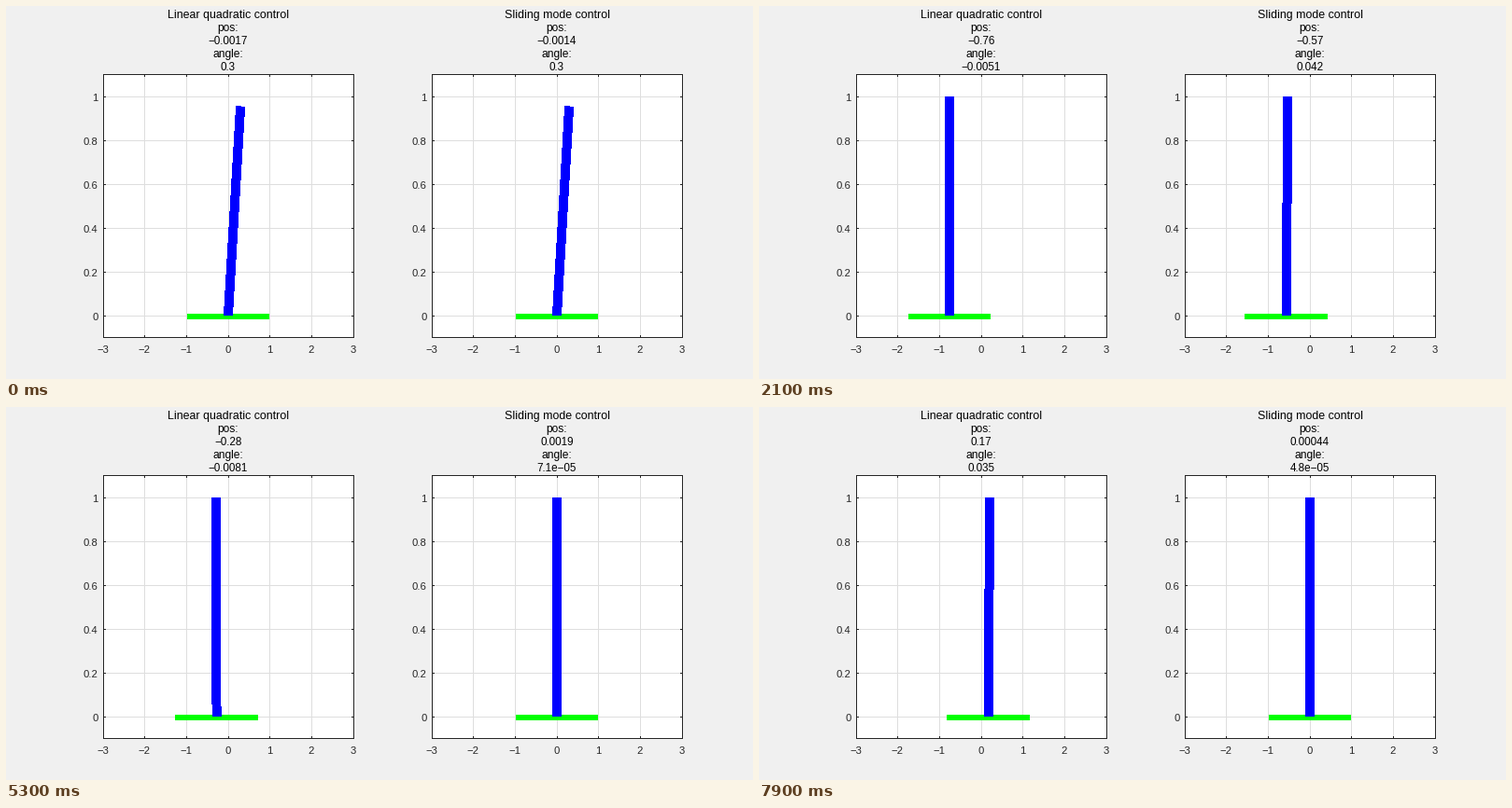
Write a matplotlib script that moves like this. It is 800 px wide and 400 px high and loops after 8 s.

```python
import numpy as np
import matplotlib.pyplot as plt
from matplotlib.animation import FuncAnimation
from matplotlib.patches import Polygon, Rectangle

W, H, DPI = 800, 400, 100
FRAMES, STEP = 80, 100
TOP, BOTTOM, BASE, SPAN = 73, 355, 332, 268
UNIT_X, UNIT_Y = SPAN / 6, 235
DARK, GRID = "#262626", "#dedede"

plt.rcParams["font.family"] = "Liberation Sans"

# Key poses: seconds, then position and angle of each cart
KEYS = np.array([
    (0, -.0017, .3, -.0014, .3),
    (.4, -.75, .02, -.65, .08),
    (.7, -1.28, -.145, -1.335, -.13),
    (1, -1.41, -.15, -1.66, -.21),
    (1.5, -1.22, -.085, -1.295, -.092),
    (2.1, -.76, -.0051, -.57, .042),
    (2.9, -.21, .055, -.052, .057),
    (3.6, -.12, .022, .022, .019),
    (4.4, -.19, .0042, .01, .0035),
    (5.4, -.283, -.01, .0016, -6e-5),
    (6.2, -.22, -.019, .00058, -9.2e-5),
    (7.9, .17, .035, .00044, 4.8e-5)])


def spline(t, knots, values):
    """Cubic spline through the knots, at rest at both ends."""
    h = np.diff(knots)[:, None]
    rise = np.diff(values, axis=0) / h ** 2
    system = np.eye(len(knots))
    target = np.zeros_like(values)
    for i in range(1, len(knots) - 1):
        a, b = 1 / h[i - 1, 0], 1 / h[i, 0]
        system[i, i - 1:i + 2] = a, 2 * (a + b), b
        target[i] = 3 * (rise[i - 1] + rise[i])
    m = np.linalg.solve(system, target)

    i = np.clip(np.searchsorted(knots, t, side="right") - 1, 0, len(h) - 1)
    h = h[i]
    s = (t - knots[i])[:, None] / h
    return ((1 + 2 * s) * (1 - s) ** 2 * values[i]
            + s * (1 - s) ** 2 * h * m[i]
            + s * s * (3 - 2 * s) * values[i + 1]
            + s * s * (s - 1) * h * m[i + 1])


def number(v):
    return f"{v:.2g}".replace("-", "\u2212")


fig = plt.figure(figsize=(W / DPI, H / DPI), dpi=DPI, facecolor="#f0f0f0")
ax = fig.add_axes([0, 0, 1, 1])
ax.set_xlim(0, W)
ax.set_ylim(H, 0)
ax.axis("off")


def label(x, y, s, px=12, color="black", ha="center"):
    return ax.text(x, y, s, fontsize=px * 72 / DPI, color=color, ha=ha,
                   va="baseline")


def box(x0, y0, x1, y1, color):
    """Fill whole pixels, both corners included."""
    ax.add_patch(Rectangle((x0, y0), x1 - x0 + 1, y1 - y0 + 1, fc=color, lw=0))


class Panel:
    def __init__(self, left, title, states):
        self.left, self.mid = left, left + SPAN / 2
        self.states = states
        self.draw_axes()
        label(self.mid, 13, title, 12.4)
        label(self.mid, 27, "pos:")
        label(self.mid, 55, "angle:")
        self.pos = label(self.mid, 41, "", 11.6)
        self.angle = label(self.mid, 69, "", 11.6)
        self.cart = self.shape("#00ff00")
        self.pole = self.shape("#0000ff")

    def shape(self, color):
        return ax.add_patch(Polygon([(0, 0)] * 4, fc=color, lw=0,
                                    antialiased=False, zorder=4))

    def draw_axes(self):
        left, right = self.left, self.left + SPAN
        xs = [int(left + k * UNIT_X) for k in range(7)]
        ys = [BASE - 47 * k for k in range(6)]
        box(left, TOP, right, BOTTOM, "white")
        for x in xs[1:-1]:
            box(x, TOP, x, BOTTOM, GRID)
        for y in ys:
            box(left, y, right, y, GRID)
        for k, x in enumerate(xs):
            box(x, TOP, x, TOP + 2, DARK)
            box(x, BOTTOM - 2, x, BOTTOM, DARK)
            label(x, 372, number(k - 3), 11.2, DARK)
        for k, y in enumerate(ys):
            box(left, y, left + 2, y, DARK)
            box(right - 2, y, right, y, DARK)
            label(left - 5.5, y + 5, number(k / 5), 11.2, DARK, "right")
        for y in (TOP, BOTTOM):
            box(left, y, right, y, DARK)
        for x in (left, right):
            box(x, TOP, x, BOTTOM, DARK)

    def update(self, i):
        p, a = self.states[i]
        x = self.mid + UNIT_X * p
        # Hard-edged fills take every touched pixel, so inset by half a pixel
        half = UNIT_X - .5
        self.cart.set_xy([(x - half, 329.5), (x + half, 329.5),
                          (x + half, 335.5), (x - half, 335.5)])
        rod = np.array([UNIT_X * np.sin(a), -UNIT_Y * np.cos(a)])
        along = rod / np.hypot(*rod)
        side = 4.5 * np.array([-along[1], along[0]])
        foot = np.array([x, BASE]) + along / 2
        tip = np.array([x, BASE]) + rod - along / 2
        self.pole.set_xy([foot - side, tip - side, tip + side, foot + side])
        self.pos.set_text(number(p))
        self.angle.set_text(number(a))


times = np.arange(FRAMES) * STEP / 1000
motion = spline(times, KEYS[:, 0], KEYS[:, 1:])
panels = [Panel(104, "Linear quadratic control", motion[:, :2]),
          Panel(456, "Sliding mode control", motion[:, 2:])]


def draw(i):
    for panel in panels:
        panel.update(i)
    return []


anim = FuncAnimation(fig, draw, frames=FRAMES, interval=STEP, repeat=True,
                     repeat_delay=0)
plt.show()
```
